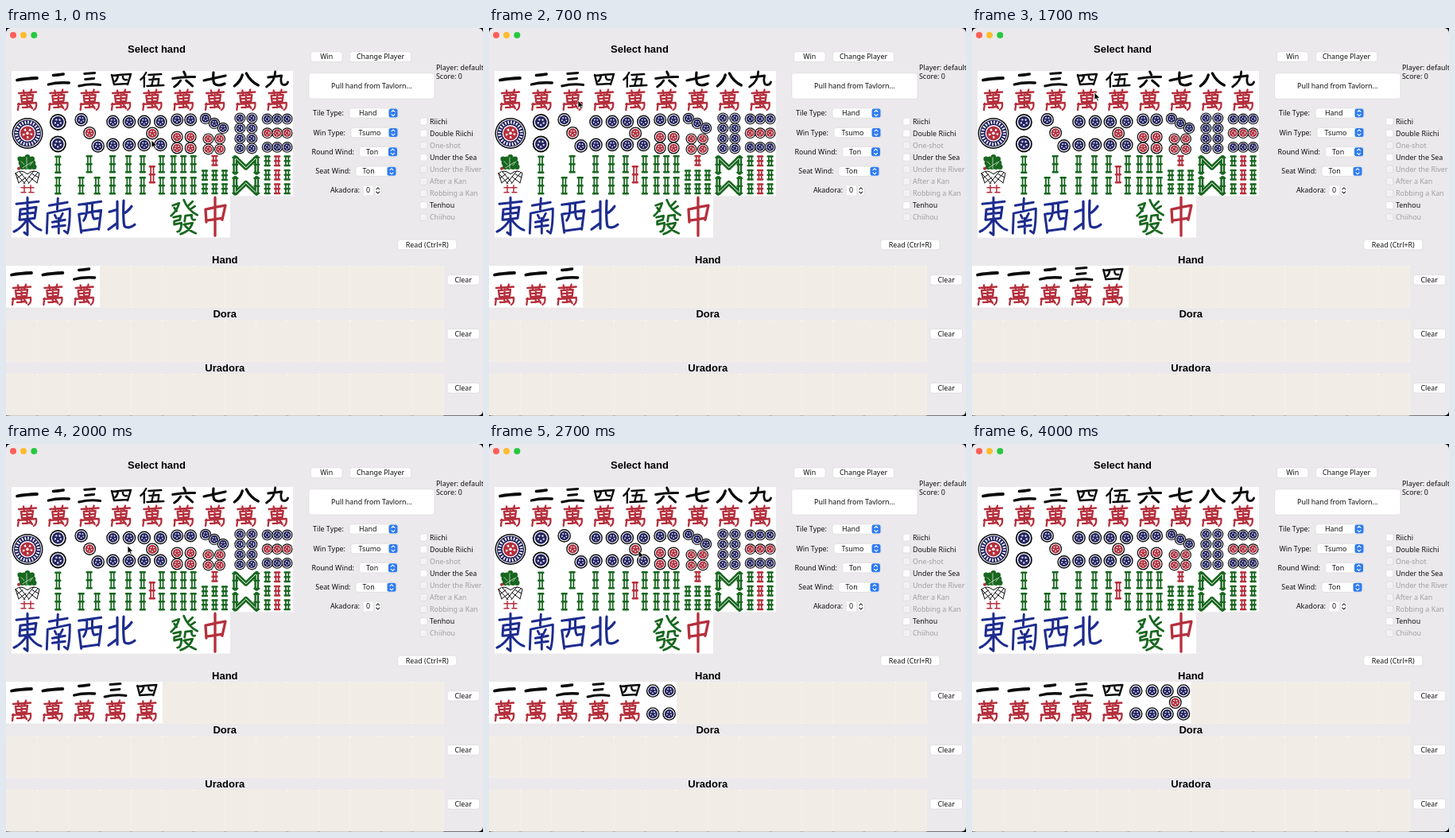
Recreate the animation shown at these times as an HTML page. Size 600 by 488 pixels, loop 4.1 s.

```html
<!DOCTYPE html>
<html lang="en">
<head>
<meta charset="utf-8">
<title>Hand picker</title>
<style>
  html, body { margin: 0; width: 100%; height: 100%; overflow: hidden; background: #000; }
  svg { display: block; width: 600px; height: 488px; }
  text { font: 8.9px "Noto Sans", "Open Sans", sans-serif; fill: #111; }
  .title { font: bold 13px "Liberation Sans", Arial, sans-serif; text-anchor: middle; fill: #000; }
  .mid { text-anchor: middle; }
  .end { text-anchor: end; }
  .off { fill: #a09ea0; }
  .button { fill: #fff; stroke: #d6d4d6; stroke-width: .6; }
  .ink { fill: none; stroke-linecap: round; stroke-linejoin: round; }
</style>
</head>
<body>
<svg id="stage" viewBox="0 0 600 488"></svg>
<script>
const LOOP = 4100, TILE_W = 39.33, TILE_H = 52.4;
const BLACK = '#0b0b0b', NAVY = '#23235f', BLUE = '#1d2c8e', RED = '#b52f3c', GREEN = '#18671f';

// Basic shapes
const ink = (color, width, d) => `<path class="ink" stroke="${color}" stroke-width="${width}" d="${d}"/>`;
const rect = (x, y, w, h, fill, rx = 0) => `<rect x="${x}" y="${y}" width="${w}" height="${h}" fill="${fill}" rx="${rx}"/>`;
const disc = (x, y, r, fill) => `<circle cx="${x}" cy="${y}" r="${r}" fill="${fill}"/>`;
const label = (x, y, text, cls = '') => `<text x="${x}" y="${y}" class="${cls}">${text}</text>`;
const at = (x, y, body, extra = '') => `<g transform="translate(${x} ${y})" ${extra}>${body}</g>`;

// Character tiles: a brushed numeral over a red "ten thousand"
const numerals = [
  'M7 11.5Q18 9.5 32 9',
  'M13 5.5Q20 5 26 4M7 17Q18 14 33 15',
  'M13 3.5 26 2.5M14 10.5 25 9.5M6 19Q20 15.5 33 17.5',
  'M8 5 11 17M8 6Q20 4.5 32 4L28 17M16 6Q15 11 12.5 13M22 5Q21 12 27 11M11 17 28 16',
  'M12 2Q9 8 5 11M9.5 8V20M15 5 31 4M22 5 19 18M16 11 28 10 27 18M13 19 34 18',
  'M20 1 22 5M6 9.5Q20 7 34 7.5M16 12Q13 17 8 20M23 12Q28 16 31 19',
  'M6 12Q20 9 33 6M18 2Q17 12 19 16Q24 20 32 16',
  'M15 5Q13 13 5 19M20 3Q25 13 35 18',
  'M8 8Q18 7 25 6Q23 14 26 17Q31 19 33 14M17 1Q17 13 6 20'
];
const numeralWidths = [3.8, 3.3, 2.9, 2.5, 2.3, 3, 3.2, 3.4, 2.8];
const myriad = ink(RED, 2.3, 'M9 28 31 26.5M15 24.5 16 30M25 23.5 23 30M12 31 27 30 26 38 13 39Z' +
  'M13 35 26 34M19.5 30V46M8 42 31 40Q32 47 28 49M9 41 8 49M14 46 25 45M23 42.5 26 47');
const characters = numerals.map((d, i) => ink(BLACK, numeralWidths[i], d) + myriad);

// Circle tiles
const pin = (x, y, r = 8, color = NAVY) =>
  disc(x, y, r, BLACK) + disc(x, y, r * .83, '#fff') + disc(x, y, r * .7, color) +
  `<circle cx="${x}" cy="${y}" r="${r * .34}" fill="none" stroke="#dfe0ef" stroke-width="${r * .2}" stroke-dasharray="${r * .21}"/>`;
const grid = (xs, ys, draw) => ys.map(y => xs.map(x => draw(x, y)).join('')).join('');
const redPin = r => (x, y) => pin(x, y, r, RED);
const bluePin = r => (x, y) => pin(x, y, r);
const corners = grid([9.5, 30], [11.5, 40.5], bluePin(8.3));
const ring = (r, color, width, dash) =>
  `<circle cx="20" cy="26" r="${r}" fill="none" stroke="${color}" stroke-width="${width}" stroke-dasharray="${dash}"/>`;
const circles = [
  disc(20, 26, 19.5, BLACK) + disc(20, 26, 18, '#fff') + disc(20, 26, 17, NAVY) +
    ring(13.8, '#fff', 4, '1.6 2') + disc(20, 26, 10.3, '#fff') + disc(20, 26, 9, RED) +
    ring(5, '#fff', 2.6, '2.2 4.08') + disc(20, 26, 1.8, '#fff'),
  grid([19], [12, 39.5], bluePin(10.5)),
  pin(9, 9, 8.3) + pin(19.5, 25.5, 8, RED) + pin(30, 42, 8.3),
  corners,
  corners + pin(19.8, 26, 8, RED),
  grid([11.5, 28.5], [9], bluePin(8)) + grid([11.5, 28.5], [30.5, 44.5], redPin(7.5)),
  pin(8, 7.5, 7.2) + pin(19, 13.5, 7.2) + pin(30, 19.5, 7.2) + grid([11.5, 26], [33, 46], redPin(7)),
  grid([12, 27], [7, 19.7, 32.5, 45], bluePin(7)),
  grid([7, 19.5, 32], [8, 43.5], bluePin(6.9)) + grid([7, 19.5, 32], [25.8], redPin(6.9))
];

// Bamboo tiles
const stick = (x, y, h = 10, color = GREEN) => at(x, y,
  ink(color, 1.8, `M-1.7 ${-h}V${h}M1.7 ${-h}V${h}`) + ink(color, 2.5, `M-3 ${-h}H3M-3 0H3M-3 ${h}H3`));
const tall = (x, y) => stick(x, y);
const short = (x, y) => stick(x, y, 5.8);
const redShort = (x, y) => stick(x, y, 5.8, RED);
const bird =
  grid([12, 17, 22, 27], [6, 11, 16], (x, y) => disc(x + (y - 11) / 4, y, 3.3, GREEN)) +
  disc(20, 3.5, 3.3, GREEN) + ink('#d6ead2', .8, 'M12 9 16 13M19 4V18M27 9 23 14M14 17 25 10') +
  disc(9, 18, 2, RED) +
  ink(BLACK, 1, 'M5 24 17 37M10 22 22 36M33 23 21 37M28 21 15 37M5 24Q12 18 20 25Q28 18 35 24L32 36M5 24 9 36M7 30 14 25M34 29 26 25M9 36 18 29M32 36 22 28') +
  ink(RED, 1.5, 'M16 39V48M24 39V48M12 42H28M12 48H18M22 48H28');
const posts = grid([9, 29], [12.5, 39.5], tall);
const outer = grid([7.5, 31.5], [12.5, 39.5], tall);
const zigzag = 'M6 23V4L19.5 17 33 4V23M6 30V49L19.5 36 33 49V30';
const bamboos = [
  bird,
  grid([19], [13, 39.5], tall),
  tall(19, 12.5) + grid([9, 29], [39.5], tall),
  posts,
  outer + stick(19.5, 25.5, 10, RED),
  grid([7, 19.5, 32], [12.5, 39.5], tall),
  redShort(19.5, 8) + grid([7, 19.5, 32], [26.5, 43.5], short),
  ink(GREEN, 5.8, zigzag) + ink('#fff', 1, zigzag) +
    ink(GREEN, 2.3, 'M3 4H9M30 4H36M3 23H9M30 23H36M3 30H9M30 30H36M3 49H9M30 49H36M3 13H9M30 13H36M3 40H9M30 40H36'),
  grid([7, 32], [8.5, 26, 43.5], short) + grid([19.5], [8.5, 26, 43.5], redShort)
];

// Wind and dragon tiles
const honors = [
  ink(BLUE, 3, 'M6 10 34 7M11 17 10 30M11 17 31 14 29 28M11 23 29 21M11 30 29 28M20 2V49L16 46M19 30Q13 40 3 45M21 29Q28 40 37 43'),
  ink(BLUE, 2.9, 'M8 12 31 8M19 3 18 17M6 22 5 47M6 22 34 16Q34 38 31 47L27 44M15 24 17 28M25 22 22 28M12 33 28 30M12 39 28 37M20 28V47'),
  ink(BLUE, 3, 'M6 11 34 7M6 23 9 46M6 23 34 18 31 42M16 10Q17 24 12 31M23 9Q22 25 25 29L30 28M9 44 31 41'),
  ink(BLUE, 3.2, 'M5 20 15 17M15 7V41M4 42 15 34M33 13Q28 20 23 22M23 6Q22 30 24 38Q29 42 37 36'),
  '',
  ink(GREEN, 2.8, 'M6 12 14 9Q12 18 4 25M8 15 11 19M20 5Q25 18 37 24M31 7 25 13M34 13 28 17M7 27 16 25 15 30 8 32 8 36 17 34Q17 45 12 45' +
    'M22 25 21 32M22 25 30 24Q29 31 34 30M20 36 31 34Q28 44 16 48M22 38Q27 44 35 47'),
  ink(RED, 3.3, 'M8 17 9 33M8 17Q20 14 33 12L29 30M9 31 29 28M20 2V50')
];

// Window controls
const button = (x, y, w, h, text) =>
  `<rect class="button" x="${x}" y="${y}" width="${w}" height="${h}" rx="3"/>` + label(x + w / 2, y + h / 2 + 3.1, text, 'mid');
const chevrons = (x, y, color) => ink(color, 1.1, `M${x - 2} ${y - 1.6}l2 -2 2 2M${x - 2} ${y + 1.6}l2 2 2 -2`);
const dropdown = (caption, captionEnd, x, y, right, value, valueX) =>
  label(captionEnd, y + 3.2, caption, 'end') +
  `<rect class="button" x="${x}" y="${y - 6.2}" width="${right - x}" height="12.4" rx="3"/>` +
  label(valueX, y + 3.2, value) + rect(right - 11.5, y - 5.5, 11, 11, '#2f7cf0', 2.5) + chevrons(right - 6, y, '#fff');
const option = ([text, enabled], i) => {
  const y = 117.5 + i * 15.06;
  return `<rect x="520.8" y="${y - 4.5}" width="9" height="9" rx="2" fill="${enabled ? '#fff' : '#f3f1f3'}" stroke="#d4d2d4" stroke-width=".6"/>` +
    label(533, y + 3.2, text, enabled ? '' : 'off');
};
const options = [['Riichi', 1], ['Double Riichi', 1], ['One-shot', 0], ['Under the Sea', 1], ['Under the River', 0],
  ['After a Kan', 0], ['Robbing a Kan', 0], ['Tenhou', 1], ['Chiihou', 0]];
const slots = (name, y) => {
  let body = label(275.3, y - 3.5, name, 'title') + rect(0, y, 14 * TILE_W, TILE_H, '#fbfaf7');
  for (let i = 0; i < 14; i++) body += rect(i * TILE_W, y, TILE_W + .1, TILE_H, '#f1ede6', 2.5);
  return body + button(555, y + 11.5, 40.5, 12.6, 'Clear');
};

const picker = [characters, circles, bamboos, honors].map((row, r) =>
  row.map((face, c) => at(7 + c * TILE_W, 54 + r * TILE_H, face)).join('')).join('');
const hand = [characters[0], characters[0], characters[1], characters[2], characters[3], circles[3], circles[4]];

document.getElementById('stage').innerHTML =
  rect(0, 0, 600, 488, '#000') + rect(0, 0, 600, 487.5, '#ebe9eb', 6) +
  disc(9, 9, 4, '#fe5f57') + disc(22, 9, 4, '#febc2e') + disc(35.3, 9, 4, '#28c840') +
  label(189.5, 31, 'Select hand', 'title') +
  rect(7, 54, 354, 157.2, '#fff') + rect(7, 211, 275, 52.6, '#fff') + picker +
  button(383.5, 29.8, 39.5, 12.7, 'Win') + button(432.5, 29.8, 77, 12.7, 'Change Player') +
  button(380.8, 56.8, 158.2, 32.4, 'Pull hand from Tavlorn...') +
  label(541, 53, 'Player: default') + label(541, 63.7, 'Score: 0') +
  dropdown('Tile Type:', 425, 432, 107, 493, 'Hand', 444) +
  dropdown('Win Type:', 427, 434, 131.5, 493, 'Tsumo', 443.5) +
  dropdown('Round Wind:', 438, 444.5, 155.7, 492.5, 'Ton', 453) +
  dropdown('Seat Wind:', 433.5, 440, 180.2, 491, 'Ton', 448.5) +
  label(445, 207.3, 'Akadora:', 'end') + rect(450, 198.5, 11.5, 11.8, '#fff') + label(453, 207.3, '0') +
  '<rect class="button" x="463.5" y="198" width="8.5" height="12.8" rx="3.5"/>' + chevrons(467.8, 204.4, '#333') +
  options.map(option).join('') + button(492.8, 266, 74, 12.8, 'Read (Ctrl+R)') +
  slots('Hand', 299) + slots('Dora', 367) + slots('Uradora', 435) +
  hand.map((face, i) => at(i * TILE_W, 299, rect(0, 0, TILE_W + .1, TILE_H, '#fff') + face, 'class="held"')).join('') +
  '<path id="cursor" d="M0 0V9.5L2.2 7.6 3.8 11 5.3 10.3 3.8 7H6.7Z" fill="#000" stroke="#fff" stroke-width=".7"/>';

// Pointer stops as [time, x, y]; each click adds one tile
const stops = [[0, 183, 141], [500, 112, 91], [1000, 112, 91], [1300, 154, 81], [1700, 154, 81],
  [1900, 153, 128], [2400, 153, 128], [2700, 188, 134], [3000, 177, 140], [LOOP, 177, 140]];
const clicks = [1000, 1700, 2400, 3000];
const held = document.querySelectorAll('.held');
const cursor = document.getElementById('cursor');

function pointer(t) {
  const i = stops.findIndex(stop => stop[0] > t);
  const [t0, x0, y0] = stops[i - 1], [t1, x1, y1] = stops[i];
  const k = (t - t0) / (t1 - t0), ease = k * k * (3 - 2 * k);
  return [x0 + (x1 - x0) * ease, y0 + (y1 - y0) * ease];
}

function draw() {
  const t = Math.floor(performance.now() % LOOP / 100) * 100;
  const count = 3 + clicks.filter(click => t >= click).length;
  held.forEach((tile, i) => tile.style.display = i < count ? '' : 'none');
  cursor.setAttribute('transform', `translate(${pointer(t).join(' ')})`);
  cursor.style.display = t < 3700 ? '' : 'none';
  requestAnimationFrame(draw);
}
draw();
</script>
</body>
</html>
```
